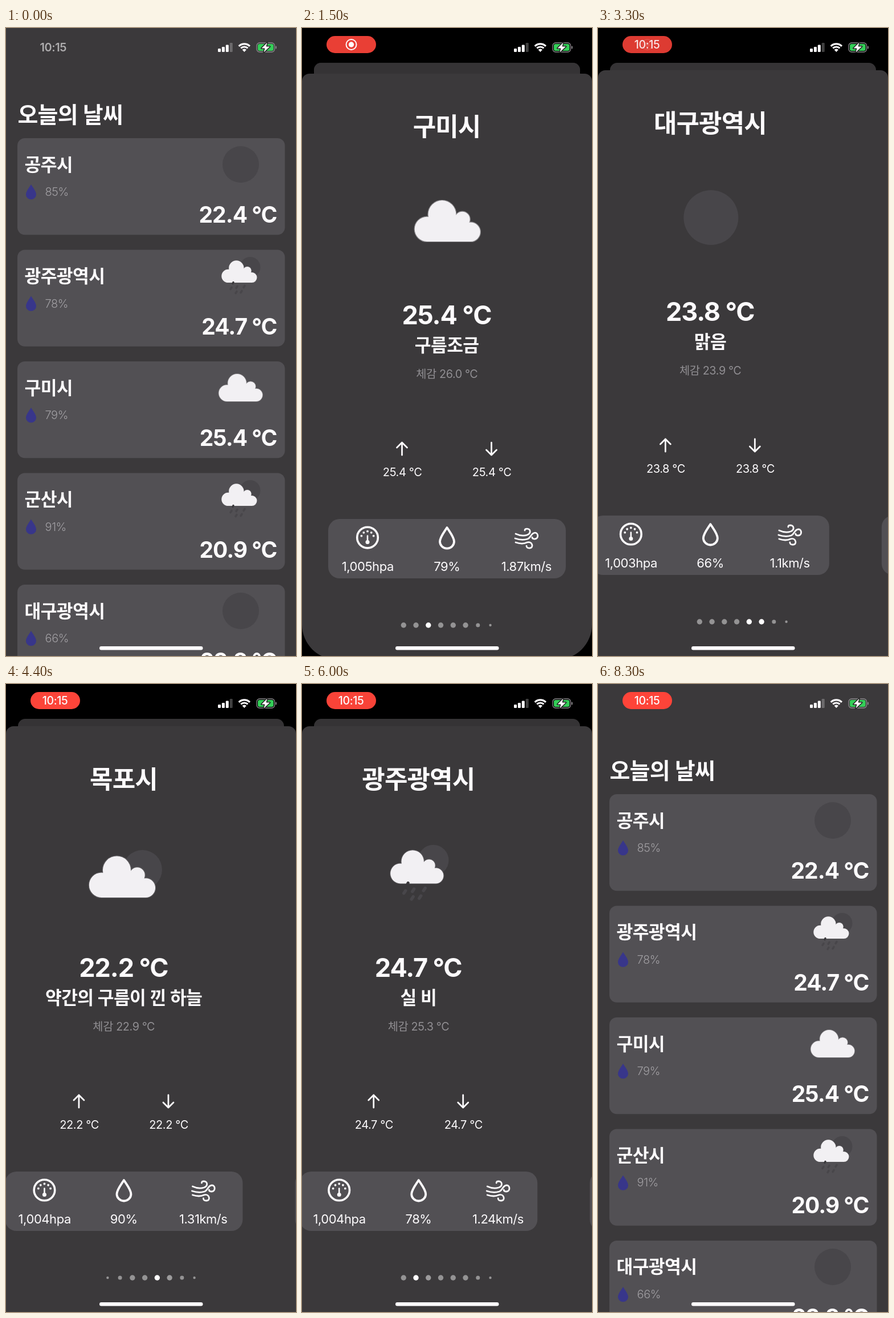
An HTML page with a canvas that plays this animation: 509 px wide and 1100 px high, repeating every 8400 ms.

```html
<!DOCTYPE html>
<html lang="ko">
<head>
<meta charset="utf-8">
<title>오늘의 날씨</title>
<style>
html, body { margin: 0; width: 100%; height: 100%; overflow: hidden; background: #000; }
canvas { display: block; }
</style>
</head>
<body>
<canvas id="stage" width="509" height="1100"></canvas>
<script>
const W = 509, H = 1100, LOOP = 8.4;
const BG = '#3b393b', CARD = '#525054', DIM = '#48464a', WHITE = '#fdfbfd';
const ctx = document.getElementById('stage').getContext('2d');

// name, temperature, feels like, description, pressure, humidity, wind, icon
const cities = [
  ['공주시', '22.4', '23.0', '맑음', '1,004', 85, '0.53', 'sun'],
  ['광주광역시', '24.7', '25.3', '실 비', '1,004', 78, '1.24', 'rain'],
  ['구미시', '25.4', '26.0', '구름조금', '1,005', 79, '1.87', 'cloud'],
  ['군산시', '20.9', '21.4', '실 비', '1,004', 91, '0.69', 'rain'],
  ['대구광역시', '23.8', '23.9', '맑음', '1,003', 66, '1.1', 'sun'],
  ['대전광역시', '22.9', '23.5', '구름조금', '1,004', 83, '1.2', 'cloud'],
  ['목포시', '22.2', '22.9', '약간의 구름이 낀 하늘', '1,004', 90, '1.31', 'few'],
  ['부산광역시', '23.1', '23.7', '맑음', '1,004', 84, '1.54', 'sun'],
];

// Swipes in the detail sheet; the dot window follows the selected page.
const FIRST = 2;
const swipes = [[2, 1], [2.65, 1], [3.26, 1], [3.54, 1], [3.83, 1], [4.12, -1], [4.42, -1],
  [4.63, -1], [4.85, -1], [5.36, -1], [5.72, -1], [6.1, -1]].map(([at, dir]) => ({ at, dir }));
let page = FIRST, first = 0;
for (const s of swipes) {
  s.from = page;
  page += s.dir;
  s.to = page;
  const before = first;
  if (page - first > 5) first = page - 5;
  else if (page - first < 2) first = Math.min(first, Math.max(0, page - 2));
  s.shift = first - before;
}

const clamp = (v, a = 0, b = 1) => Math.min(b, Math.max(a, v));
const ramp = (t, a, b) => clamp((t - a) / (b - a));
const spring = (t, w) => t <= 0 ? 0 : 1 - (1 + w * t) * Math.exp(-w * t);

function at(x, y, scale, draw) {
  ctx.save();
  ctx.translate(x, y);
  ctx.scale(scale, scale);
  draw();
  ctx.restore();
}
function box(x, y, w, h, r, color) {
  ctx.beginPath();
  ctx.roundRect(x, y, w, h, r);
  if (color) { ctx.fillStyle = color; ctx.fill(); }
}
function disc(x, y, r, color) {
  ctx.beginPath();
  ctx.arc(x, y, r, 0, 7);
  ctx.fillStyle = color;
  ctx.fill();
}
function line(d, width, color = WHITE) {
  ctx.strokeStyle = color;
  ctx.lineWidth = width;
  ctx.lineCap = ctx.lineJoin = 'round';
  ctx.stroke(new Path2D(d));
}
function shape(d, color) {
  ctx.fillStyle = color;
  ctx.fill(new Path2D(d));
}
function text(s, x, y, size, weight, { color = WHITE, align = 'center', track = -.02 } = {}) {
  ctx.font = `${weight} ${size}px Inter, "Noto Sans CJK KR", "Noto Sans CJK", sans-serif`;
  ctx.letterSpacing = track * size + 'px';
  ctx.textAlign = align;
  ctx.fillStyle = color;
  ctx.fillText(s, align === 'center' ? x + track * size / 2 : x, y);
}

const cloudPath = new Path2D();
for (const [x, y, r] of [[-24.5, 9.7, 14.6], [-6.5, -7.8, 16.5], [17.5, -2, 9], [27.5, 13, 11.3]]) {
  cloudPath.moveTo(x + r, y);
  cloudPath.arc(x, y, r, 0, 7);
}
cloudPath.rect(-24.5, 2, 52, 22.3);
cloudPath.rect(0, -3, 20, 10);

function cloud(x, y, scale, edge = '#858386') {
  at(x, y, scale * .985, () => {
    ctx.strokeStyle = edge;
    ctx.lineWidth = 1.6;
    ctx.stroke(cloudPath);
    ctx.fillStyle = '#f2f0f3';
    ctx.fill(cloudPath);
  });
}
const icons = {
  sun: () => disc(0, 0, 32, DIM),
  cloud: () => cloud(0, 0, 1),
  few: () => { disc(21, -4.5, 23, DIM); cloud(-2.5, 3.8, 1.01, '#5a585b'); },
  rain: () => {
    disc(16.5, -15.5, 18, DIM);
    cloud(-2.5, -7.8, .81, '#5a585b');
    line('M-13 11l-1 2', 3.4, '#3a383b');
    line('M-16 20l-2 3M-6 18l-2 3M-7 27l-2 3M2 26l-2 3M7 17l-2 3', 3.6, DIM);
  },
};

const drop = 'M0-18C5-10 12.5-1 12.5 6.5A12.5 12 0 0 1-12.5 6.5C-12.5-1-5-10 0-18Z';
function gauge() {
  ctx.beginPath();
  ctx.arc(0, 0, 18.3, 0, 7);
  ctx.strokeStyle = WHITE;
  ctx.lineWidth = 3.6;
  ctx.stroke();
  for (let a = -165; a <= -15; a += 37.5) {
    const r = a * Math.PI / 180;
    disc(11 * Math.cos(r), 11 * Math.sin(r), 1.9, WHITE);
  }
  line('M0 8V-3', 2.6);
  disc(0, 8, 3.5, WHITE);
}
function wind() {
  line('M-19-8q11 5 20 2c8-3 6-11 0-11q-4 0-4 3' +
    'M-20 0q12 4 22 1c6-2 6-11 13-11c6 0 7 11-1 11q-4 0-4-3' +
    'M-19 7q12 4 20 0c9-3 13 10 4 10q-5 0-5-4', 2.8);
}

function drawList() {
  ctx.fillStyle = BG;
  ctx.fillRect(0, 0, W, H);
  text('오늘의 날씨', 20.5, 166, 39, 600, { align: 'left' });
  cities.slice(0, 5).forEach(([name, temp, , , , humidity, , icon], i) => at(0, 193 + 195.5 * i, 1, () => {
    box(20, 0, 469.5, 169.3, 13, CARD);
    text(name, 32.5, 57.5, 31.3, 600, { align: 'left' });
    at(44, 94, .72, () => shape(drop, '#38368a'));
    text(humidity + '%', 68.5, 101, 20, 300, { align: 'left', color: '#a19fa3' });
    at(412, 46, 1, icons[icon]);
    text(temp + ' °C', 475.5, 148, 39, 700, { align: 'right', track: -.025 });
  }));
}

function drawPage([name, temp, feels, desc, pressure, humidity, speed, icon]) {
  const mid = 254.5;
  text(name, mid, 182.7, 44, 600);
  at(mid + 1, 332, 1.5, icons[icon]);
  text(temp + ' °C', mid, 512.5, 45, 700, { track: -.025 });
  text(desc, mid, 561, 31.3, 600);
  text(`체감 ${feels} °C`, mid, 606.5, 19.8, 400, { color: '#918f93' });
  for (const [x, flip] of [[175.5, 1], [332.5, -1]]) {
    at(x, 731, 1, () => line(`M0 ${11 * flip}V${-11 * flip}M-9 ${-2 * flip}L0 ${-11 * flip}L9 ${-2 * flip}`, 2.8));
    text(temp + ' °C', x + .8, 778.5, 20, 400);
  }
  box(46, 854, 417, 104, 20, CARD);
  at(115, 886.5, 1, gauge);
  at(mid, 887, 1, () => line(drop, 3.8));
  at(394, 888, 1, wind);
  text(pressure + 'hpa', 115.5, 945, 22, 400);
  text(humidity + '%', mid, 945, 22, 400);
  text(speed + 'km/s', 394, 945, 22, 400);
}

function drawDots(t) {
  let start = 0, active = FIRST, fading = -1, glow = 0;
  for (const s of swipes) {
    start += s.shift * spring(t - s.at, 14);
    if (t >= s.at) {
      active = s.to;
      fading = s.from;
      glow = 1 - ramp(t, s.at + .05, s.at + .3);
    }
  }
  for (let i = 0; i < 14; i++) {
    const slot = i - start;
    const depth = Math.min(slot + 2 * (1 - clamp(start)), 7 - slot);
    const r = depth < 0 ? 2.2 * (1 + depth) : Math.min(4.7, 2.2 + 1.3 * depth);
    if (r <= 0) continue;
    const light = i === active ? 1 : i === fading ? glow : 0;
    const v = 148 + 107 * light;
    disc(178.3 + 21.75 * slot, 1040, r, `rgb(${v},${v - 1},${v})`);
  }
}

function drawSheet(t, shown) {
  const bottom = shown < .9995 ? 61 : 0;
  ctx.save();
  ctx.translate(0, (H - 74) * (1 - shown));
  box(0, 74, W, H - 74, [13, 13, bottom, bottom], BG);
  ctx.clip();
  const pos = swipes.reduce((p, s) => p + s.dir * spring(t - s.at, 14), FIRST);
  cities.forEach((city, i) => {
    if (Math.abs(i - pos) < 1) at((i - pos) * W, 0, 1, () => drawPage(city));
  });
  drawDots(t);
  ctx.restore();
}

function drawPill(t) {
  ctx.globalAlpha = .6 * (1 - ramp(t, 0, .2));
  text('10:15', 83, 41, 20, 600);
  const grow = spring(t - .25, 16);
  if (!grow) return (ctx.globalAlpha = 1);
  at(86.5, 29, grow, () => {
    ctx.globalAlpha = .93 + .07 * Math.cos(t / 2.1 * 2 * Math.PI);
    box(-43.5, -15, 87, 30, 15, '#ff453a');
    const clock = ramp(t, 2.9, 3.35);
    ctx.globalAlpha = 1 - clock;
    ctx.beginPath();
    ctx.arc(0, 0, 9, 0, 7);
    ctx.strokeStyle = WHITE;
    ctx.lineWidth = 2;
    ctx.stroke();
    disc(0, 0, 4.7, WHITE);
    ctx.globalAlpha = clock;
    text('10:15', -.3, 7, 19.5, 500);
  });
  ctx.globalAlpha = 1;
}

function drawStatus() {
  [6, 9, 12.5, 16].forEach((h, i) =>
    box(372 + 6.9 * i, 42 - h, 5, h, 1.3, i < 3 ? WHITE : 'rgba(255,255,255,.25)'));
  ctx.strokeStyle = WHITE;
  ctx.lineCap = 'butt';
  ctx.lineWidth = 3.2;
  for (const r of [8.5, 13.6]) {
    ctx.beginPath();
    ctx.arc(418.3, 41.5, r, -Math.PI * .75, -Math.PI * .25);
    ctx.stroke();
  }
  shape('M418.3 42L414.6 38Q418.3 35 422 38Z', WHITE);
  box(440, 26, 31.5, 16, 5);
  ctx.strokeStyle = '#8b898c';
  ctx.lineWidth = 1.3;
  ctx.stroke();
  box(442, 28, 27.5, 12, 3, '#34ce58');
  box(473, 31.5, 1.8, 5, 1, '#8b898c');
  const bolt = 'M458.5 25.5L448.5 35.5H454.5L452.5 42.5L463 32.5H456.5Z';
  line(bolt, 3, '#222');
  shape(bolt, '#fff');
}

function draw(t) {
  const shown = spring(t - 1.105, 18.3) - spring(t - 7.35, 14);
  ctx.fillStyle = '#000';
  ctx.fillRect(0, 0, W, H);

  const scale = 1 - .0825 * shown;
  ctx.save();
  ctx.translate(W * (1 - scale) / 2, 61 * shown);
  ctx.scale(scale, scale);
  box(0, 0, W, H, 14 * shown);
  ctx.clip();
  drawList();
  ctx.fillStyle = `rgba(0,0,0,${.1 * shown})`;
  ctx.fillRect(0, 0, W, H);
  ctx.restore();

  if (shown > .0005) drawSheet(t, shown);
  drawPill(t);
  drawStatus();
  box(164, 1083, 181.5, 6.5, 3.25, WHITE);
}

function tick() {
  draw(performance.now() / 1000 % LOOP);
  requestAnimationFrame(tick);
}
tick();
</script>
</body>
</html>
```
